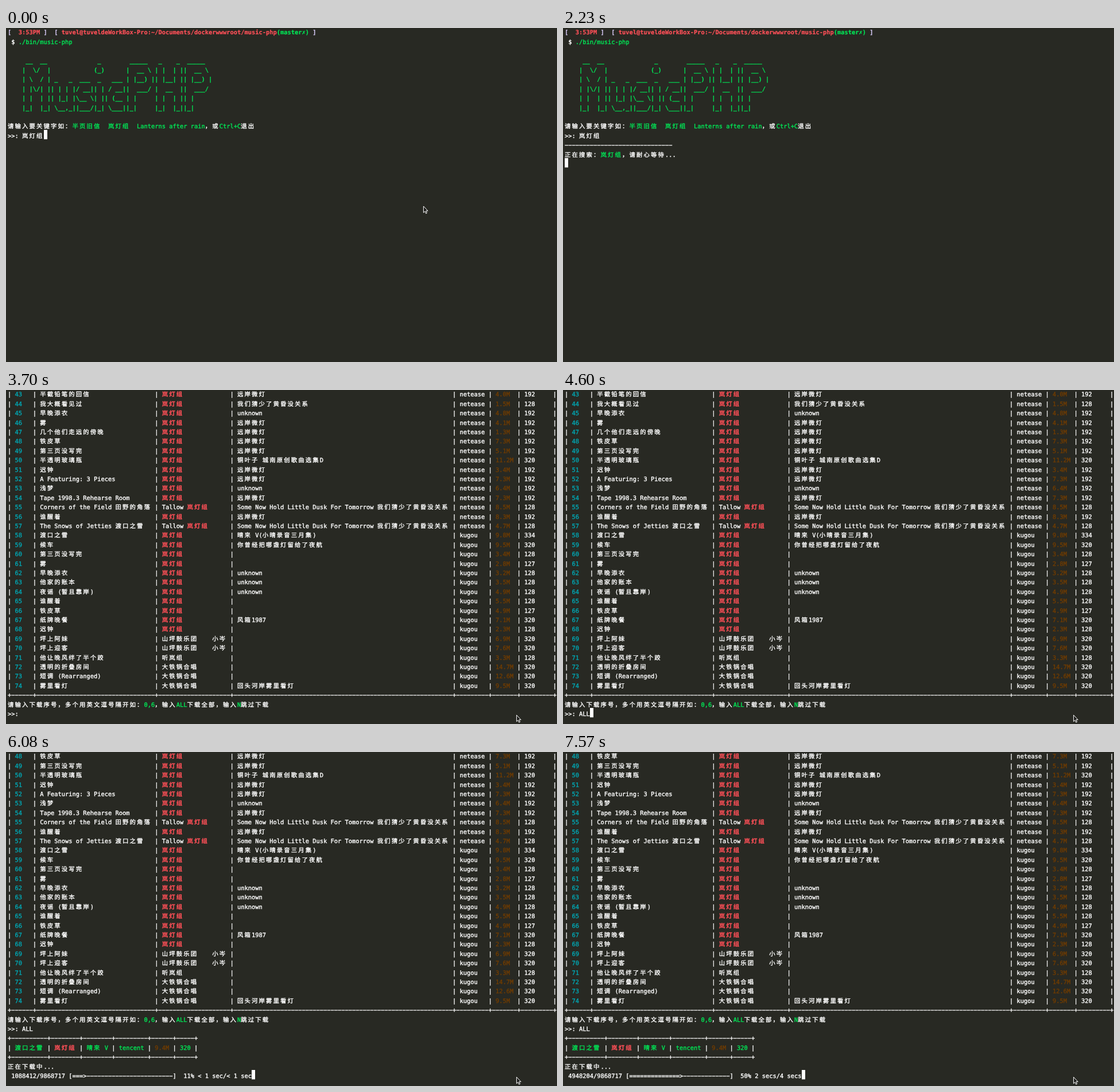
An HTML page for the animation above (8000 ms loop, 960 by 583 pixels).

```html
<!DOCTYPE html>
<html lang="zh-CN">
<head>
<meta charset="utf-8">
<title>music-php</title>
<style>
  html, body { margin: 0; width: 100%; height: 100%; overflow: hidden; background: #282923; }
  svg { display: block; width: 960px; height: 583px; }
  text {
    font: 10.38px "DejaVu Sans Mono", "Noto Sans CJK SC", "Noto Sans CJK", monospace;
    white-space: pre;
    text-rendering: geometricPrecision;
    stroke-width: .38px;
  }
  .bold { font-weight: bold; stroke-width: .2px; }
</style>
</head>
<body>
<svg id="stage" viewBox="0 0 960 583" xmlns="http://www.w3.org/2000/svg"></svg>
<script>
const LOOP = 8000;
const CELL = 6.25, LINE = 16.4, LEFT = 3, BASE = 11.3, CURSOR_TOP = -2.6;
const WHITE = '#ffffff', GREEN = '#00e756', RED = '#ff5058', CYAN = '#00a6b2',
      BROWN = '#703c00', PALE = '#d4c8f4';
const BAND = '岚灯组';
const stage = document.getElementById('stage');

function add(parent, tag, attrs = {}) {
  const el = document.createElementNS(stage.namespaceURI, tag);
  for (const key in attrs) el.setAttribute(key, attrs[key]);
  return parent.appendChild(el);
}

const isWide = ch => ch.codePointAt(0) > 0x2e80;

// Puts text on the terminal grid and returns the next free column.
function place(el, row, col, str) {
  const xs = [];
  for (const ch of str) {
    xs.push((LEFT + col * CELL).toFixed(2));
    col += isWide(ch) ? 2 : 1;
  }
  el.setAttribute('x', xs.join(' '));
  el.setAttribute('y', (BASE + row * LINE).toFixed(2));
  el.textContent = str;
  return col;
}

function write(parent, row, col, str, color = WHITE, bold = false) {
  const el = add(parent, 'text', { fill: color, stroke: color });
  if (bold) el.setAttribute('class', 'bold');
  return place(el, row, col, str);
}

// Each part is [text, color, bold].
function writeLine(parent, row, parts, col = 0) {
  for (const part of parts) col = write(parent, row, col, ...part);
}

const dashes = n => '−'.repeat(n);

function rule(parent, row, stops) {
  let str = '+';
  for (let i = 1; i < stops.length; i++) str += dashes(stops[i] - stops[i - 1] - 1) + '+';
  write(parent, row, 0, str);
}

function pipes(parent, row, stops) {
  for (const stop of stops) write(parent, row, stop, '|');
}

// Start screen
const intro = add(stage, 'g');
writeLine(intro, 0, [
  ['[  ', PALE, true], ['3:53PM', RED, true], [' ]  [ ', PALE, true],
  ['tuvel@tuveldeWorkBox-Pro:~/Documents/dockerwwwroot/music-php', RED, true],
  ['(master✗)', GREEN, true], [' ]', PALE, true]
]);
writeLine(intro, 1, [[' $ '], ['./bin/music-php', GREEN]]);
String.raw`
     __  __              _        _____   _    _  _____
    |  \/  |            (_)      |  __ \ | |  | ||  __ \
    | \  / | _   _  ___  _   ___ | |__) || |__| || |__) |
    | |\/| || | | |/ __|| | / __||  ___/ |  __  ||  ___/
    | |  | || |_| |\__ \| || (__ | |     | |  | || |
    |_|  |_| \__,_||___/|_| \___||_|     |_|  |_||_|
`.split('\n').slice(1, -1).forEach((str, i) => write(intro, 3 + i, 0, str, GREEN, true));
writeLine(intro, 10, [
  ['请输入要关键字如：'], [`半页旧信  ${BAND}  Lanterns after rain`, GREEN],
  ['，或'], ['Ctrl+C', GREEN], ['退出']
]);
write(intro, 11, 0, '>>: ' + BAND);

const search = add(stage, 'g');
write(search, 12, 0, dashes(30));
writeLine(search, 13, [['正在搜索：'], [BAND, GREEN], ['，请耐心等待...']]);

// Result table: title|artist|album|size|rate, where * is the band and ~ the usual album
const FIRST = 43;
const SONGS = `半截铅笔的回信|*|~|4.0|192
我大概看见过|*|我们猜少了黄昏没关系|1.5|128
早晚添衣|*|unknown|4.8|192
雾|*|~|4.1|192
几个他们走远的傍晚|*|~|1.3|192
铁皮草|*|~|7.3|192
第三页没写完|*|~|5.1|192
半透明玻璃瓶|*|铜叶子 城南原创歌曲选集D|11.2|320
迟钟|*|~|3.4|192
A Featuring: 3 Pieces|*|~|7.3|192
浅梦|*|unknown|6.4|192
Tape 1998.3 Rehearse Room|*|~|7.3|192
Corners of the Field 田野的角落|Tallow *|Some Now Hold Little Dusk For Tomorrow 我们猜少了黄昏没关系|8.5|128
谁醒着|*|~|8.3|192
The Snows of Jetties 渡口之雪|Tallow *|Some Now Hold Little Dusk For Tomorrow 我们猜少了黄昏没关系|4.7|128
渡口之雪|*|晴来 V(小晴录音三月集)|9.8|334
候车|*|你曾经把哪盏灯留给了夜航|9.5|320
第三页没写完|*||3.4|128
雾|*||2.8|127
早晚添衣|*|unknown|3.2|128
他家的账本|*|unknown|3.5|128
夜谣 (暂且靠岸)|*|unknown|4.9|128
谁醒着|*||5.5|128
铁皮草|*||4.9|127
纸牌晚餐|*|风箱1987|7.1|320
迟钟|*||2.3|128
坪上阿妹|山坪鼓乐团    小岑||6.9|320
坪上迎客|山坪鼓乐团    小岑||7.6|320
他让晚风绊了半个跤|听岚组||3.3|128
透明的折叠房间|大铁锅合唱||14.7|320
短调 (Rearranged)|大铁锅合唱||12.6|320
雾里看灯|大铁锅合唱|回头河岸雾里看灯|9.5|320`.split('\n');

const table = add(stage, 'g');
const STOPS = [0, 7, 41, 62, 124, 134, 142, 152];
SONGS.forEach((song, row) => {
  const [title, artist, album, size, rate] = song.split('|');
  const id = FIRST + row;
  pipes(table, row, STOPS);
  write(table, row, 2, String(id), CYAN);
  write(table, row, 9, title);
  const col = write(table, row, 43, artist.replace('*', ''));
  if (artist.endsWith('*')) write(table, row, col, BAND, RED, true);
  write(table, row, 64, album === '~' ? '远岸微灯' : album);
  write(table, row, 126, id < 58 ? 'netease' : 'kugou');
  write(table, row, 136, size + 'M', BROWN);
  write(table, row, 144, rate);
});
rule(table, 32, STOPS);
writeLine(table, 33, [
  ['请输入下载序号，多个用英文逗号隔开如：'], ['0,6', GREEN], ['，输入'],
  ['ALL', GREEN], ['下载全部，输入'], ['N', GREEN], ['跳过下载']
]);
write(table, 34, 0, '>>:');
const answer = add(table, 'text', { fill: WHITE, stroke: WHITE });

// Download
const download = add(stage, 'g');
const BOX = [0, 11, 20, 29, 39, 46, 52];
rule(download, 30, BOX);
rule(download, 32, BOX);
pipes(download, 31, BOX);
[['渡口之雪', GREEN], [BAND, RED, true], ['晴来 V', GREEN], ['tencent', GREEN],
 ['9.4M', BROWN], ['320', GREEN]].forEach((part, i) => write(download, 31, BOX[i] + 2, ...part));
write(download, 33, 0, '正在下载中...');
const progress = add(download, 'text', { fill: WHITE, stroke: WHITE });

const cursor = add(stage, 'rect', { width: 6, height: LINE, fill: WHITE });
const pointer = add(stage, 'path', {
  d: 'M0 0V11.3L2.5 8.9L4.2 12.8L6 12L4.3 8.2H7.6Z',
  fill: '#1c1c1a', stroke: WHITE, 'stroke-width': 1, 'stroke-linejoin': 'round'
});

// Schedules: [start, ...values]
const CURSOR = [
  [0, 11, 10], [150, 14, 0], [600], [1200, 14, 0], [1650], [2230, 14, 0], [2660],
  [3260, 34, 4], [3700], [3850, 34, 5], [4300, 34, 6], [4600, 34, 7],
  [5190, 34, 0], [5340, 34, 68], [5780], [6080, 34, 68], [6380, 34, 66]
];
const POINTER = [
  [0, 727.4, 311], [1650, 816.9, 476.6], [1790, 865.9, 523.6], [1940, 904.6, 576.6],
  [2080], [2660, 889.6, 567.4]
];
const TYPED = [[0, ''], [3850, 'A'], [4300, 'AL'], [4600, 'ALL']];
const TOTAL = 9868717;
const PROGRESS = [
  [0], [5340, 0, '< 1 sec', '< 1 sec'], [6080, 1088412, '< 1 sec', '< 1 sec'],
  [6380, 1979134, '1 sec', '5 secs'], [6830, 2968824, '1 sec', '3 secs'],
  [7280, 3958514, '2 secs', '5 secs'], [7570, 4948204, '2 secs', '4 secs']
];

const at = (schedule, t) => schedule.findLast(step => step[0] <= t).slice(1);
const show = (el, on) => el.setAttribute('display', on ? 'inline' : 'none');

function progressText([done, elapsed, estimate]) {
  if (done === undefined) return '';
  const share = done / TOTAL, filled = Math.floor(share * 28);
  const bar = '='.repeat(filled) + '>' + dashes(27 - filled);
  const percent = String(Math.floor(share * 100)).padStart(3);
  return ` ${String(done).padStart(7)}/${TOTAL} [${bar}] ${percent}% ${elapsed.padStart(6)}/${estimate}`;
}

function draw(t) {
  show(intro, t < 2660);
  show(search, t >= 150 && t < 2660);
  show(table, t >= 2660);
  show(download, t >= 5190);
  table.setAttribute('transform', `translate(0 ${t >= 5190 ? -5 * LINE : 0})`);
  place(answer, 34, 4, at(TYPED, t)[0]);
  place(progress, 34, 0, progressText(at(PROGRESS, t)));

  const [row, col] = at(CURSOR, t);
  show(cursor, row !== undefined);
  if (row !== undefined) {
    cursor.setAttribute('x', Math.round(LEFT + col * CELL));
    cursor.setAttribute('y', CURSOR_TOP + row * LINE);
  }
  const [x, y] = at(POINTER, t);
  show(pointer, x !== undefined);
  if (x !== undefined) pointer.setAttribute('transform', `translate(${x} ${y})`);
}

const start = performance.now();
function tick() {
  draw((performance.now() - start) % LOOP);
  requestAnimationFrame(tick);
}
tick();
</script>
</body>
</html>
```
